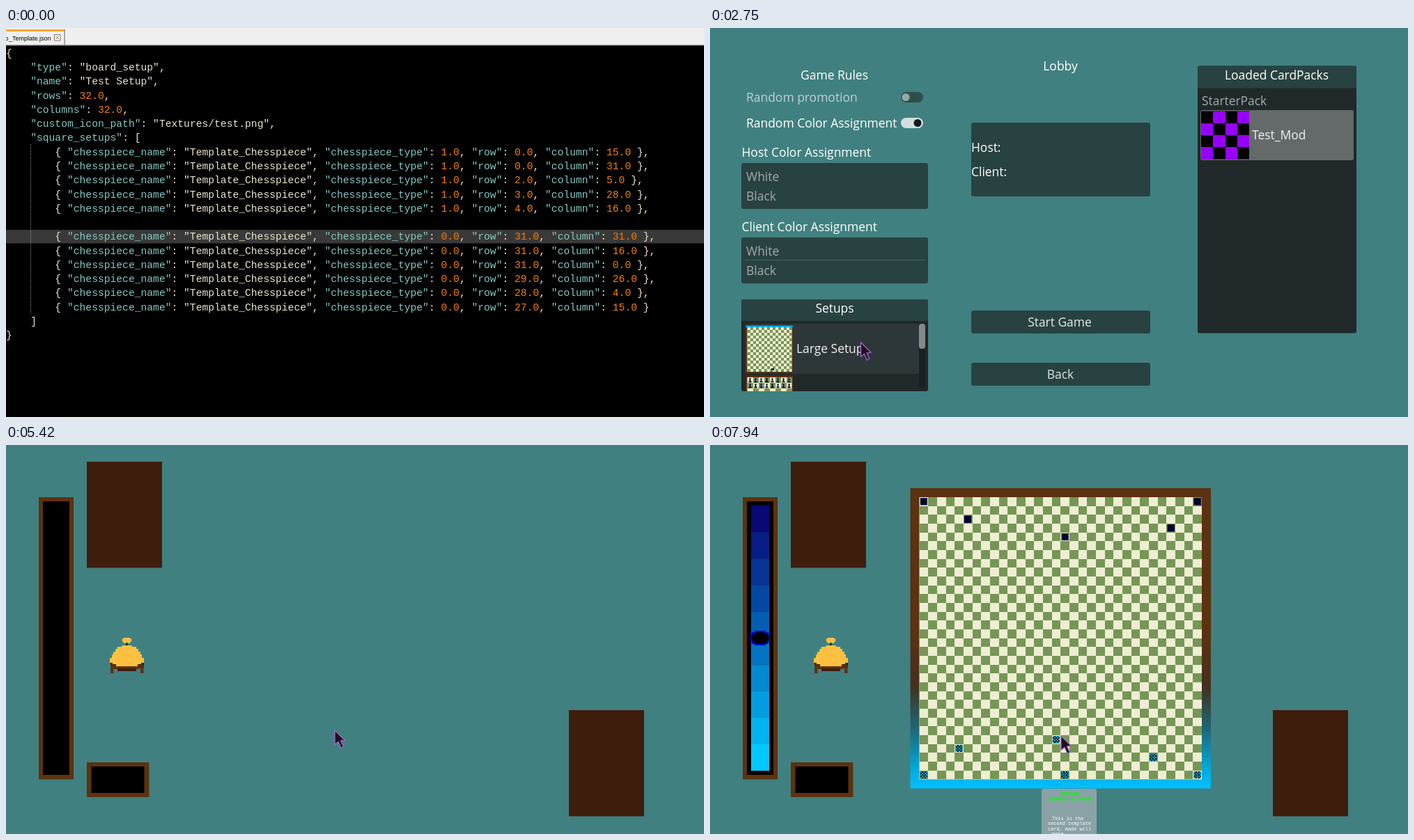
Write an HTML page that moves like this. It is 1002 px wide and 559 px high and loops after 7.99 s.

```html
<!DOCTYPE html>
<html lang="en">
<head>
<meta charset="utf-8">
<title>Board setup</title>
<style>
html, body { margin: 0; width: 100%; height: 100%; overflow: hidden; background: #000; }
svg { display: block; width: 100%; height: 100%; }
text { white-space: pre; }
.ui { font: 17.45px "Open Sans", "Noto Sans", sans-serif; fill: #fff; }
.code { font: 14.667px "Liberation Mono", monospace; fill: #f0e2cc; }
.log { font: 11.67px "Liberation Mono", monospace; }
.card { font: bold 7.8px "Liberation Mono", monospace; fill: #0f0; }
.desc { font: 6.9px "Liberation Mono", monospace; fill: #fff; }
.pix { shape-rendering: crispEdges; }
</style>
</head>
<body>
<svg id="stage" viewBox="0 0 1002 559" preserveAspectRatio="none"></svg>
<script>
const LOOP = 7990;
const PANEL = '#284241', BODY = '#20282a', WOOD = '#5c3210', DECK = '#3f1d0c';
const LIGHT = '#eeeed2', GREEN = '#769656', DIM = '#a3abab';

const rect = (x, y, w, h, fill, more = '') =>
  `<rect x="${x}" y="${y}" width="${w}" height="${h}" fill="${fill}" ${more}/>`;
const box = (x, y, w, h, fill, more = '') => rect(x, y, w, h, fill, 'rx="3" ' + more);
const text = (x, y, s, more = '') => `<text x="${x}" y="${y}" ${more}>${s}</text>`;
const mid = (x, y, s, more = '') => text(x, y, s, 'text-anchor="middle" ' + more);
const group = (id, body, more = '') => `<g id="${id}" ${more}>${body}</g>`;

// cells of one parity as a single path
function checks(cols, rows, w, h, fill, odd = 1) {
  let d = '';
  for (let r = 0; r < rows; r++)
    for (let c = 0; c < cols; c++)
      if ((r + c) % 2 === odd) d += `M${c * w} ${r * h}h${w}v${h}h${-w}z`;
  return `<path d="${d}" fill="${fill}" class="pix"/>`;
}
const modIcon = (x, y) =>
  `<g transform="translate(${x} ${y})">${rect(0, 0, 69, 69, '#000')}${checks(4, 4, 17.25, 17.25, '#9600ff')}</g>`;

// ---------- editor ----------
const piece = (type, row, col, end = ' },') =>
  `        { "chesspiece_name": "Template_Chesspiece", "chesspiece_type": ${type}.0, "row": ${row}.0, "column": ${col}.0${end}`;
const source = [
  '{', '    "type": "board_setup",', '    "name": "Test Setup",', '    "rows": 32.0,', '    "columns": 32.0,',
  '    "custom_icon_path": "Textures/test.png",', '    "square_setups": [',
  piece(1, 0, 15), piece(1, 0, 31), piece(1, 2, 5), piece(1, 3, 28), piece(1, 4, 16), '',
  piece(0, 31, 31), piece(0, 31, 16), piece(0, 31, 0), piece(0, 29, 26), piece(0, 28, 4), piece(0, 27, 15, ' }'),
  '    ]', '}'
];
const paint = line => line
  .replace(/"[^"]*"(:?)|\d+\.\d/g, (m, colon) => {
    if (m[0] !== '"') return `<tspan fill="#f57f0a">${m}</tspan>`;
    return colon ? `<tspan fill="#85c9c6">${m.slice(0, -1)}</tspan>:` : `<tspan fill="#ebe6cf">${m}</tspan>`;
  });

function editor() {
  return rect(0, 0, 1002, 559, '#000') + rect(0, 0, 1002, 24, '#f0f0f0') + rect(0, 24, 1002, 1.5, '#8c8c8c') +
    rect(0, 2, 84, 3, '#faa832') + rect(83.5, 2, 1.2, 22, '#777') +
    text(4, 17.5, '_Template.json', 'font-family="Liberation Sans, sans-serif" font-size="9"') +
    text(-1.5, 17.5, 'o', 'font-family="Liberation Sans, sans-serif" font-size="9"') +
    '<path d="M69.5 9.5h8.5v8.5h-8.5zM71.5 11.5l4.5 4.500M76 11.500l-4.500 4.500" fill="#fff" stroke="#8a7060"/>' +
    rect(0, 290, 1002, 19.5, '#393939') +
    '<path d="M35.5 167V411" stroke="#aaa" stroke-dasharray="1 1.5"/>' +
    source.map((s, i) => text(0, 40.8 + i * 20.27, paint(s), 'class="code"')).join('');
}

const log = [
  'ed.', 's (core/extension/gdextension_library_loader.cpp:121)', 'WARNING: the project was opened with a newer build, some values differ',
  'version 4.4.tut', 'settings manager is ready, loading saved settings (ok)', 'setting_manager_loaded.',
  'icial.4c311cbee - https://godotengine.org'
];
const consoleWin = () => rect(-300, -20, 963, 429, '#000') +
  log.map((s, i) => text(0, 9.5 + i * 14.1, s, `class="log" fill="${i === 6 ? '#fff' : i % 2 ? '#aaa' : '#777'}"`)).join('');

// ---------- lobby ----------
const toggle = (y, back, knob, x) => rect(274, y, 32, 15, back, 'rx="7.5"') + `<circle cx="${x}" cy="${y + 7.5}" r="5.5" fill="${knob}"/>`;
const choice = y => box(45, y, 268, 66, PANEL) +
  text(52, y + 25.5, 'White', `fill="${DIM}"`) + text(52, y + 54, 'Black', `fill="${DIM}"`);
const pawn = (x, y, s, fill) =>
  `<path transform="translate(${x} ${y}) scale(${s})" fill="${fill}" d="M-2-5h4v4h-1l1 4h2v3h-8v-3h2l1-4h-1z"/>`;

function setupIcon(i) {
  if (i === 3) return modIcon(50, 2.5);
  let s = rect(51.500, 2.5, 67.500, 68, WOOD);
  if (i === 0)
    s += rect(51.5, 2.5, 67.5, 2.5, '#00a8e8') +
      `<g transform="translate(53.500 5)">${rect(0, 0, 64, 64, LIGHT)}${checks(16, 16, 4, 4, GREEN)}</g>` + rect(88, 64, 4, 3, '#123');
  if (i === 1) {
    s += `<g transform="translate(53.5 5)">${rect(0, 0, 64, 64, LIGHT)}${checks(8, 8, 8, 8, GREEN)}</g>`;
    for (let k = 0; k < 16; k++) s += pawn(57.5 + k % 8 * 8, 9 + (k >> 3) * 8, .55, k % 3 ? '#1a0a50' : '#000');
  }
  if (i === 2) {
    s += `<g transform="translate(53.5 3)">${rect(0, 0, 64, 66, LIGHT)}${checks(2, 3, 32, 22, GREEN, 0)}</g>`;
    for (const x of [69, 101])
      s += `<ellipse cx="${x}" cy="36" rx="10" ry="8" fill="#b4b4b4" stroke="#222" stroke-dasharray="3 2"/>` + pawn(x, 57, 1.6, '#00008c');
    s += rect(96, 47, 10, 4, '#00008c');
  }
  return s;
}

function lobby() {
  const setups = ['Large Setup', 'Default Setup', 'Very Weird', 'Test Setup'];
  const items = setups.map((s, i) => `<g transform="translate(0 ${425 + i * 72})">` +
    box(50, 0, 250, 72, i ? '#646a6a' : '#2d3638', `id="back${i}" opacity="0"`) + setupIcon(i) +
    text(124, 42, s, `id="name${i}" fill="${DIM}"`) + '</g>').join('');
  return rect(0, 0, 1002, 559, '#418080') +
    mid(178.5, 73.5, 'Game Rules') + mid(503, 61, 'Lobby') +
    text(52, 106, 'Random promotion', 'fill="#c0d2d2"') + toggle(92, '#2d4e4d', '#97a8a8', 281) +
    text(52, 143, 'Random Color Assignment') + toggle(129, '#d2dfdf', '#14181c', 298) +
    text(45.5, 184.5, 'Host Color Assignment') + choice(194) +
    text(45.5, 291.5, 'Client Color Assignment') + choice(301) + rect(50, 333, 259, 1, '#4a6261') +
    box(45, 390, 268, 132, BODY) + box(45, 390, 268, 31, PANEL) + mid(179, 409, 'Setups') +
    `<g clip-path="url(#list)">${group('scroll', items)}</g>` +
    rect(300, 425, 9, 92, '#182022', 'rx="4"') + rect(300, 425, 9, 36, '#858989', 'rx="4" id="thumb"') +
    box(375, 136, 257, 106, PANEL) + text(375, 178, 'Host:') + text(375, 213, 'Client:') +
    box(375, 406, 257, 33, PANEL, 'id="start"') + mid(502, 428.7, 'Start Game', 'fill="#e6eaea"') +
    box(375, 481, 257, 33, PANEL) + mid(503, 503.700, 'Back', 'fill="#e0e4e4"') +
    box(700, 54.5, 228, 384, BODY) + box(700, 54.5, 228, 32, PANEL) + mid(813.5, 73.5, 'Loaded CardPacks') +
    text(706, 110.5, 'StarterPack', `fill="${DIM}"`) +
    box(704, 118, 220, 72, '#646a6a', 'id="mod"') + modIcon(705, 119.500) + text(778, 160, 'Test_Mod', 'fill="#f0f0f0"');
}

// ---------- game ----------
const ORIGIN = [300, 75], CELL = 12.67;
const enemy = [[0, 0], [31, 0], [5, 2], [28, 3], [16, 4]];
const own = [[31, 31], [16, 31], [0, 31], [26, 29], [4, 28], [15, 27]];
const at = ([c, r]) => [300.500 + (c + .5) * CELL, 75 + (r + .5) * CELL];
const token = (id, [x, y], fill) =>
  `<g id="${id}" transform="translate(${x} ${y})"><g transform="translate(-5 -5)">${rect(0, 0, 10, 10, '#000')}${checks(5, 5, 2, 2, fill, 0)}</g></g>`;

const card = [
  ['SECOND', 502, 503.5], ['TEMPLATE CARD', 486, 510.5], ['This is the', 491, 538.5],
  ['second template', 485, 546], ['card, made will', 485, 553.5], ['make a test', 491, 561]
];

function bell() {
  const gold = '#ffc040';
  return rect(167, 278, 13, 5, gold) + rect(169, 277, 9, 8, gold) + rect(172, 284, 2.500, 6, '#30200c') +
    rect(150, 309, 48, 11, '#3f1d0c') + rect(150, 316, 4.500, 12, WOOD) + rect(193, 316, 4.500, 12, WOOD) +
    rect(155, 317, 37, 5, WOOD) + rect(160, 321, 27, 4, '#3f1d0c') +
    [[166, 288], [160, 290], [157, 293], [154, 297], [152, 301], [149, 306]]
      .map(([x, y]) => rect(x, y, 2 * (173.5 - x), 313 - y, gold)).join('') +
    rect(153, 312, 41, 3, gold) + rect(158, 315, 31, 3, gold);
}

function strips() {
  let s = '';
  for (let i = 0; i < 10; i++) {
    const k = i / 9;
    s += rect(59, 87 + i * 38.1, 26, 38.2, `rgb(${8 - 8 * k},${8 + 192 * k},${118 + 137 * k})`);
  }
  return s + '<path d="M61 270h4v-2h14v2h4v3h2v9h-2v3h-4v2h-14v-2h-4v-3h-2v-9h2z" fill="#000" stroke="#0000e0" stroke-width="1.8"/>';
}

function game() {
  const board = strips() + rect(287.5, 62, 431.5, 431.5, 'url(#frame)') +
    `<g transform="translate(300.5 75)">${rect(0, 0, 405.500, 405.5, LIGHT)}${checks(32, 32, CELL, CELL, GREEN)}</g>` +
    enemy.map((p, i) => token('e' + i, at(p), '#00005a')).join('') +
    own.map((p, i) => token('p' + i, ORIGIN, '#00b4e8')).join('') +
    box(476, 494, 79, 80, '#8aa2a6') +
    card.map(([s, x, y], i) => text(x, y, '', `id="line${i}" class="${i < 2 ? 'card' : 'desc'}"`)).join('');
  return rect(0, 0, 1002, 559, '#418080') +
    rect(47, 75, 50, 405.5, WOOD) + rect(53, 81, 38, 393, '#000') +
    rect(116, 24, 108, 152.5, DECK) + rect(808, 381, 108, 152.5, DECK) +
    rect(116, 456, 89.5, 50, WOOD) + rect(122.5, 462, 76, 38, '#000') + bell() + group('board', board);
}

const stage = document.getElementById('stage');
stage.innerHTML = `<defs>
  <clipPath id="list"><rect x="45" y="421" width="268" height="101"/></clipPath>
  <linearGradient id="frame" x1="0" y1="0" x2="0" y2="1">
    <stop offset=".48" stop-color="${WOOD}"/><stop offset=".66" stop-color="#44301f"/>
    <stop offset=".8" stop-color="#1f6674"/><stop offset=".94" stop-color="#00ace0"/><stop offset="1" stop-color="#00c0ff"/>
  </linearGradient></defs>` +
  group('editor', editor() + group('console', consoleWin())) + group('lobby', lobby(), 'class="ui"') + group('game', game()) +
  '<path id="cursor" d="M0 0V20.500L5 16.500L9 25.500L12.500 23.500L8.500 15L14.500 14.500Z" fill="#1c1024" stroke="#a868c8" stroke-width="1.3" stroke-linejoin="round"/>' +
  rect(0, 0, 1002, 559, '#000', 'id="black"');

const ids = {};
stage.querySelectorAll('[id]').forEach(e => ids[e.id] = e);
const set = (id, name, v) => ids[id].setAttribute(name, v);
const show = (id, on) => set(id, 'display', on ? 'inline' : 'none');
const move = (id, x, y) => set(id, 'transform', `translate(${x} ${y})`);

const ramp = (t, a, b) => Math.min(1, Math.max(0, (t - a) / (b - a)));
const smooth = k => k * k * (3 - 2 * k);

// time, x, y of the pointer
const route = [
  [2190, 850, 148], [2760, 216, 452], [2910, 215, 451], [3500, 215, 451], [3760, 205, 499], [3950, 205, 499],
  [4460, 470, 411], [5380, 470, 411], [5420, 472, 410], [6370, 472, 410], [7160, 463, 342], [7190, 463, 342], [7930, 504, 418]
];
function pointer(t) {
  let i = 0;
  while (i < route.length - 2 && t > route[i + 1][0]) i++;
  const [a, x, y] = route[i], [b, u, v] = route[i + 1], k = smooth(ramp(t, a, b));
  return [x + (u - x) * k, y + (v - y) * k];
}

function drawLobby(t, x, y) {
  const scroll = 98 * smooth(ramp(t, 3020, 3250)) + 88 * smooth(ramp(t, 3480, 3640));
  const chosen = t >= 3740, over = x > 375 && x < 632 && y > 406 && y < 439;
  move('scroll', 0, -scroll);
  move('thumb', 0, scroll / 186 * 55.5);
  const hover = x < 300 && y > 425 && scroll < 60;
  set('back0', 'opacity', hover ? 1 : 0);
  set('name0', 'fill', hover ? '#f0f0f0' : DIM);
  set('back3', 'opacity', chosen ? 1 : 0);
  set('name3', 'fill', chosen ? '#fff' : DIM);
  const ring = (id, on) => { set(id, 'stroke', on ? '#d6dada' : 'none'); set(id, 'stroke-width', 2.5); };
  set('start', 'fill', over ? '#1b3434' : PANEL);
  ring('start', over);
  ring('mod', t >= 3960);
}

function drawGame(t) {
  show('board', t >= 5590);
  own.forEach((p, i) => {
    const [x, y] = at(p), left = Math.exp(-Math.max(0, t - 5590 - i * 108) * .0102);
    move('p' + i, x + (ORIGIN[0] - x) * left, y + (ORIGIN[1] - y) * left);
  });
  let typed = Math.floor(Math.max(0, t - 5760) / 33.3);
  card.forEach(([s], i) => {
    ids['line' + i].textContent = s.slice(0, Math.max(0, typed));
    typed -= s.length;
  });
}

function draw(t) {
  const inLobby = t >= 2060 && t < 4660, [x, y] = pointer(t);
  show('editor', t < 2060);
  show('lobby', inLobby);
  show('game', t >= 4660);
  show('cursor', t >= 2060);
  move('cursor', x, y);
  set('black', 'opacity', t < 2060 ? ramp(t, 1420, 2025) : 1 - ramp(t, 2070, 2170));
  const open = ramp(t, 1395, 1600);
  set('console', 'opacity', t < 1420 ? 0 : open);
  set('console', 'transform', `translate(200 200) scale(${.952 + .048 * open}) translate(-200 -200)`);
  if (inLobby) drawLobby(t, x, y);
  if (t >= 4660) drawGame(t);
}

const begin = performance.now();
function tick() {
  draw((performance.now() - begin) % LOOP);
  requestAnimationFrame(tick);
}
tick();
</script>
</body>
</html>
```
